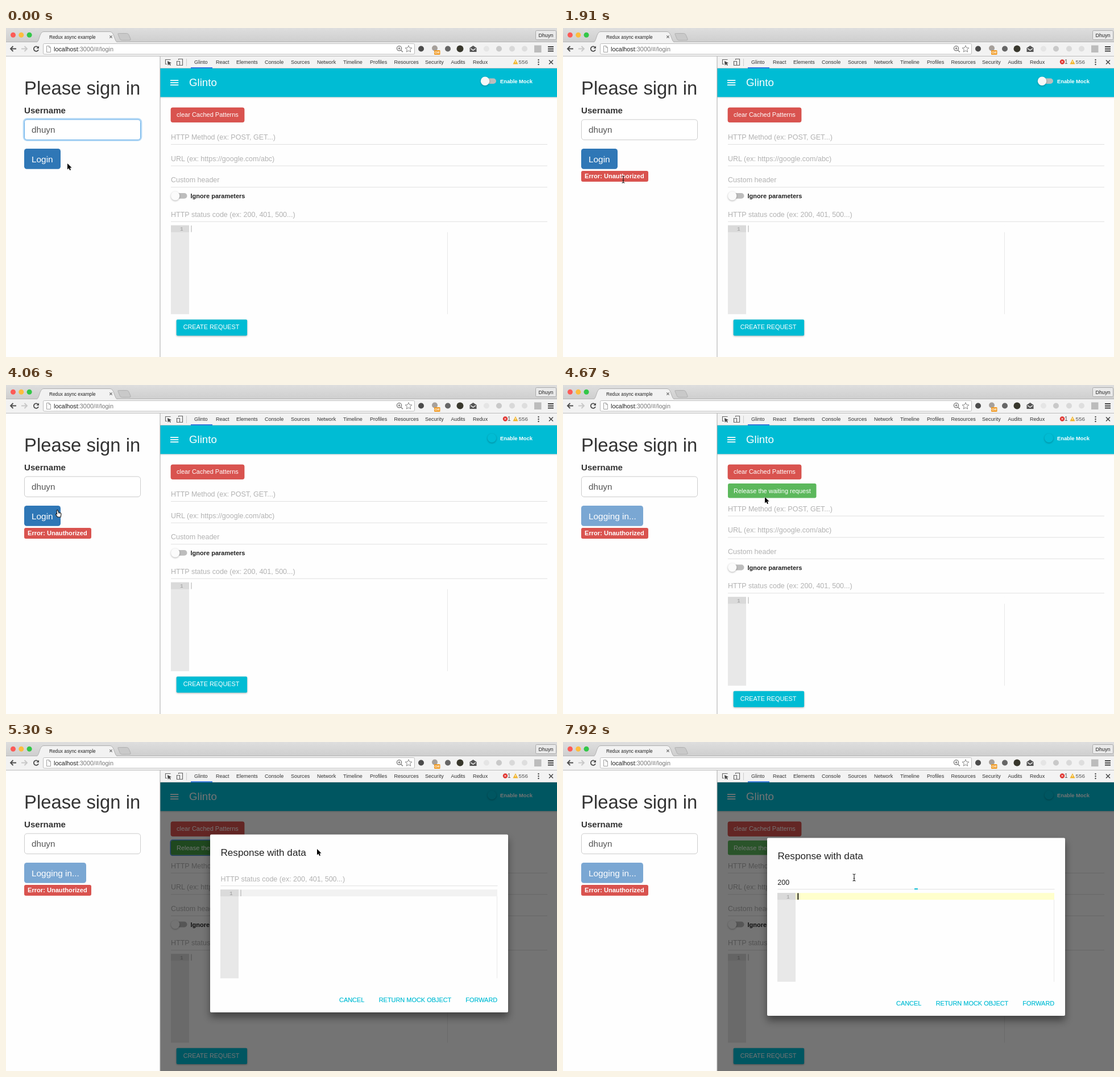
Write an HTML page that moves like this. It is 969 px wide and 578 px high and loops after 8000 ms.

```html
<!DOCTYPE html>
<html lang="en">
<head>
<meta charset="utf-8">
<title>Sign in demo</title>
<style>
html, body { margin: 0; width: 100%; height: 100%; overflow: hidden; background: #fff; }
svg { display: block; width: 969px; height: 578px; font-family: "Liberation Sans", Arial, sans-serif; }
text { white-space: pre; }
.mono { font-family: "Liberation Mono", monospace; }
.blur { filter: blur(7px); }
.soft { filter: drop-shadow(0 1px 1.5px rgba(0,0,0,.3)); }
</style>
</head>
<body>
<script>
const LOOP = 8000, CYAN = '#00bcd4', RED = '#d9534f', HINT = '#b2b2b2';

const rect = (x, y, w, h, fill, more = '') =>
  `<rect x="${x}" y="${y}" width="${w}" height="${h}" fill="${fill}" ${more}/>`;
const circle = (x, y, r, fill, more = '') => `<circle cx="${x}" cy="${y}" r="${r}" fill="${fill}" ${more}/>`;
const text = (x, y, size, fill, str, more = '') =>
  `<text x="${x}" y="${y}" font-size="${size}" fill="${fill}" ${more}>${str}</text>`;
const line = (d, stroke, width = 1, more = '') =>
  `<path d="${d}" fill="none" stroke="${stroke}" stroke-width="${width}" ${more}/>`;
const shape = (d, fill, more = '') => `<path d="${d}" fill="${fill}" ${more}/>`;
const group = (id, body, more = '') => `<g id="${id}" ${more}>${body}</g>`;
const bold = 'font-weight="700"';

function browser() {
  const lights = ['#fc5b57', '#fdbd3e', '#33c748'].map((c, i) => circle(12.5 + i * 14.3, 12.3, 4.5, c)).join('');
  return `<defs><linearGradient id="strip" x2="0" y2="1"><stop stop-color="#dedede"/>
    <stop offset="1" stop-color="#cecece"/></linearGradient></defs>` +
    rect(0, 0, 969, 25, 'url(#strip)') + rect(0, 24, 969, 1, '#b4b4b4') + lights +
    shape('M197 11Q196 9.500 198.500 9.500H212.500Q215 9.500 216 12L219 19Q220 21.500 217 21.500H204Q201.500 21.500 200.500 19.500Z', '#c9c9c9', 'stroke="#aaa" stroke-width=".8"') +
    shape('M53 25.500C59 25 58.500 6.500 66 6.500H183C191 6.500 190 25 197 25.500Z', '#f2f2f2', 'stroke="#aaa" stroke-width=".9"') +
    rect(0, 25, 969, 24, '#f2f2f2') + rect(0, 49, 969, 1, '#bcbcbc') +
    text(76, 18.5, 8.3, '#222', 'Redux async example') +
    line('M182.300 13.300l4.400 4.400m0-4.400l-4.400 4.400', '#666', 1.1) +
    rect(931.5, 4.5, 36, 16, '#e9e9e9', 'rx="2" stroke="#aaa"') +
    text(936.5, 16, 9, '#222', 'Dhuyn') +
    line('M18 36.500H8M12.500 32L8 36.500L12.500 41', '#4f4f4f', 1.9) +
    line('M27 36.500H37M32.500 32L37 36.500L32.500 41', '#c8c8c8', 1.9) +
    line('M56.300 34A4.200 4.200 0 1 0 57 38', '#4f4f4f', 1.8) + shape('M58 31.500V36H53.500Z', '#4f4f4f') +
    rect(65.5, 27.5, 653, 18.5, '#fff', 'rx="2" stroke="#bdbdbd"') +
    shape('M71.500 31.500H76L78.500 34V42.500H71.500Z', '#fafafa', 'stroke="#999" stroke-width=".9"') +
    line('M75.700 31.500V34.300H78.500', '#999', .9) +
    text(84, 40.5, 10.85, '#777', '<tspan fill="#222">localhost</tspan>:3000/#/login');
}

function toolbarIcons() {
  const star = Array.from({ length: 10 }, (_, i) => {
    const a = i * Math.PI / 5, r = i % 2 ? 2.8 : 6.3;
    return `${708 + r * Math.sin(a)} ${37 - r * Math.cos(a)}`;
  }).join('L');
  return circle(691.5, 35.8, 4.1, 'none', 'stroke="#777" stroke-width="1.3"') +
    line('M694.500 39L698 42.300M689.500 35.800H693.500M691.500 33.800V37.800', '#777', 1.2) +
    shape(`M${star}Z`, '#fff', 'stroke="#888"') +
    circle(730, 36.5, 5, '#4b4b4b') + circle(754, 35.5, 5, '#a6a09b') +
    rect(753, 39, 10.5, 8, '#f09a24', 'rx="1"') + text(754, 45.3, 5.7, '#fff', 'Off', bold) +
    circle(777, 36.5, 5, '#666') + circle(798.5, 36.5, 6, '#38372c') +
    shape('M815.500 35L821.500 31L827.500 35V42H815.500Z', '#555') +
    line('M817 36L821.500 39L826 36', '#f2f2f2', 1.5) +
    [[845, '#e5e5e5'], [867, '#c9c9c9'], [890, '#d9d9d9'], [912, '#dedede']].map(([x, c]) => circle(x, 36.5, 5, c)).join('') +
    rect(929, 30.5, 12.5, 12.5, '#bcbcbc') +
    line('M953 33H963M953 36.700H963M953 40.400H963', '#444', 2);
}

function signIn() {
  return rect(0, 50, 271, 528, '#fefefe') +
    text(32, 117, 32.8, '#333', 'Please sign in') +
    text(32, 149.5, 15.1, '#333', 'Username', bold) +
    rect(31, 159.5, 207, 38, 'none', 'id="glow" rx="6" stroke="#b5d9f6" stroke-width="2.500"') +
    rect(32.5, 160.9, 204, 35.6, '#fff', 'id="field" rx="4.500"') +
    text(45, 184, 15.2, '#555', 'dhuyn') +
    rect(31.2, 211.2, 110.6, 37.4, 'none', 'id="ring" rx="5" stroke="#9cc3ea"') +
    rect(32, 212, 64, 35.7, '#2f77b6', 'id="login" rx="4.500"') +
    text(45, 236, 15.4, '#fff', 'Login', 'id="loginText"') +
    group('error', rect(32, 251, 118, 19, RED, 'rx="3"') + text(38, 264.4, 11.1, '#fff', 'Error: Unauthorized', bold));
}

function devTools() {
  const tabs = [['Glinto', 331], ['React', 369], ['Elements', 405], ['Console', 455], ['Sources', 501], ['Network', 547],
    ['Timeline', 593], ['Profiles', 640], ['Resources', 682.5], ['Security', 737], ['Audits', 782.5], ['Redux', 821]];
  return rect(271, 50, 698, 21, '#f3f3f3') + rect(271, 70, 698, 1, '#ccc') +
    line('M289 56V55.500H280.500V63.500H283', '#666', 1.1) +
    shape('M284 58L291 61.500L288 62.500L290 65L288.700 66L286.700 63.500L284.800 66Z', '#444') +
    line('M303.500 56V54.500H310.500V65.500H305M300.500 58.500H305.500V65.500H300.500Z', '#666', 1.2) +
    rect(317, 54, 1, 13, '#ccc') + rect(325, 69, 38, 2, '#3b79d9') +
    tabs.map(([name, x]) => text(x, 63.2, 9.05, '#333', name)).join('') +
    group('badge', circle(878, 59.5, 4.2, '#e0322d') + line('M876.300 57.800l3.400 3.400m0-3.400l-3.400 3.400', '#fff', 1) +
      text(882, 63.2, 10, '#555', '1')) +
    shape('M896 55L900.500 63.500H891.500Z', '#f2b52b') + rect(895.5, 58, 1, 3, '#fff') +
    text(901.5, 63.2, 9.8, '#555', '556') +
    [56, 60, 64].map(y => circle(936.5, y, 1.2, '#444')).join('') +
    line('M955 56.500l7 7m0-7l-7 7', '#444', 1.5);
}

function editor(x, y, width, marginX, id) {
  return rect(x, y, 32, 156, '#e8e8e8') + rect(x, y, 32, 12, '#dadada') +
    rect(marginX, y, 1, 156, '#e8e8e8') +
    rect(x + 32, y, width - 32, 12, '#fefefe', `id="${id}Line"`) +
    text(x + 16, y + 9.3, 9.5, '#999', '1', 'class="mono"') +
    rect(x + 35.5, y + .3, 1, 11.5, '#aaa', `id="${id}Caret"`);
}

function panel() {
  const field = (label, y) => text(290, y, 12.5, HINT, label) + rect(290, y + 8, 662, 1, '#e0e0e0');
  return rect(271, 71, 698, 507, '#fefefe') +
    rect(271, 121, 698, 1, '#9fcfd6') + rect(271, 122, 698, 1.5, '#e9eeee') + rect(271, 71, 698, 50, CYAN) +
    line('M289 92.200H303.300M289 96.200H303.300M289 100.200H303.300', '#fff', 1.7) +
    text(322, 102.4, 18.7, '#fff', 'Glinto') +
    rect(838, 88.5, 24, 9.5, '#bdbdbd', 'id="track" rx="4.750"') +
    circle(842.5, 93.2, 7.7, '#f7f7f7', 'id="thumb" class="soft"') +
    text(869, 96.6, 9.3, '#fff', 'Enable Mock', bold) +
    rect(290, 140, 129, 25.5, RED, 'rx="3" stroke="#d04540" stroke-width=".7"') +
    text(300, 156.4, 11, '#fff', 'clear Cached Patterns') +
    group('release', rect(289.3, 172.3, 157, 27, 'none', 'id="releaseRing" rx="3.500" stroke="#3f84d8" stroke-width="1.600"') +
      rect(290, 173, 155.5, 25.5, '#5cb85c', 'id="releaseBox" rx="3"') +
      text(300, 189.6, 11, '#fff', 'Release the waiting request')) +
    group('form', field('HTTP Method (ex: POST, GET...)', 196) + field('URL (ex: https://google.com/abc)', 233.6) +
      field('Custom header', 271.2) +
      rect(293, 290, 25.5, 9.8, '#bdbdbd', 'rx="4.900"') + circle(297.7, 295, 7.7, '#fbfbfb', 'class="soft"') +
      text(324.5, 299, 11, '#222', 'Ignore parameters', bold) +
      field('HTTP status code (ex: 200, 401, 500...)', 331.6) +
      editor(290, 346.7, 662, 776, 'page') +
      rect(299.7, 512.2, 124.4, 28.3, CYAN, 'rx="2" class="soft"') +
      text(311.7, 529.2, 10.85, '#fff', 'CREATE REQUEST'));
}

function dialog() {
  const action = (x, label) => text(x, 294.6, 10.95, CYAN, label, `stroke="${CYAN}" stroke-width=".200"`);
  return group('dialog', rect(359, 8, 524, 313, '#000', 'opacity=".420" class="blur"') +
    rect(359, 0, 524, 312.5, '#fefefe', 'rx="2"') +
    text(377.5, 37, 17.1, '#222', 'Response with data') +
    text(377.5, 82.4, 12.5, HINT, 'HTTP status code (ex: 200, 401, 500...)', 'id="hint"') +
    text(377.3, 82.4, 12.5, '#222', '', 'id="code"') +
    rect(377, 69.5, 1, 15.5, '#222', 'id="codeCaret"') +
    rect(377.5, 89.7, 487, 1, '#e0e0e0') +
    rect(-243.5, 88.7, 487, 2, CYAN, 'id="underline"') +
    editor(377, 96.7, 487, 863, 'modal') +
    action(586, 'CANCEL') + action(655.7, 'RETURN MOCK OBJECT') + action(808.3, 'FORWARD'));
}

function pointers() {
  const edge = 'stroke="#fff" stroke-width="1" stroke-linejoin="round" paint-order="stroke"';
  return group('arrow', shape('M0 0V10.500L2.500 8.300L4.200 12L6 11.200L4.400 7.600H7.600Z', '#000', edge)) +
    group('beam', line('M-2.500-6Q0-6 0-4.500V4.500Q0 6-2.500 6M2.500-6Q0-6 0-4.500M0 4.500Q0 6 2.500 6M-1.300 1.500H1.300', '#222', 1.1)) +
    group('hand', shape('M-2.500-6Q-1.200-7 -.600-5.500L.300-2.200L3.500-1.500Q5-1 5 .500L4.200 6H-1.200L-4.500 1.500Q-4.500-.300-2.300 .800L-3-5Q-3-5.700-2.500-6Z', '#fff', 'stroke="#111" stroke-width="1.100"') +
      line('M.800-2V.300M2.800-1.500V.500', '#111', .7));
}

document.body.innerHTML = '<svg xmlns="http://www.w3.org/2000/svg" viewBox="0 0 969 578">' +
  browser() + toolbarIcons() + signIn() + panel() + dialogShade() + devTools() +
  rect(270.5, 50, 1, 528, '#a9a9a9') + dialog() + pointers() + '</svg>';

function dialogShade() {
  return rect(271, 71, 698, 507, '#000', 'id="shade" opacity=".540"');
}

// Pointer: time, kind, x, y
const track = [
  [0, 'arrow', 108, 238], [120, 'hand', 78, 231], [590, 'arrow', 90, 245], [710, 'arrow', 98, 255],
  [1400, 'arrow', 96, 254], [1670, 'hand', 88, 238], [1790, 'arrow', 98, 251], [1910, 'beam', 106, 266],
  [2030, 'beam', 109, 272], [2150, 'arrow', 112, 268], [2380, 'arrow', 114, 266],
  [2500, 'arrow', 135, 268], [2620, 'arrow', 220, 290], [2740, 'arrow', 330, 296], [2860, 'arrow', 490, 250],
  [2980, 'arrow', 650, 175], [3100, 'arrow', 785, 112], [3210, 'hand', 847, 98],
  [3550, 'arrow', 780, 112], [3670, 'arrow', 570, 150], [3790, 'arrow', 290, 178], [3910, 'arrow', 116, 188],
  [4060, 'hand', 92, 226], [4530, 'arrow', 239, 202], [4670, 'arrow', 355, 197], [4880, 'hand', 424, 189],
  [5150, 'beam', 424, 189], [5300, 'arrow', 547, 188], [5680, 'beam', 512, 238]
];

// Each step overrides parts of the state from its time on
const steps = [
  [0, { focus: true, login: 'idle', code: '', hint: 1, underline: 0, thumb: 842.5 }],
  [350, { focus: false, login: 'pressed' }], [470, { login: 'busy' }],
  [1060, { login: 'idle', error: true }],
  [1670, { login: 'hover' }], [1790, { login: 'idle' }],
  [3320, { thumb: 848 }], [3440, { thumb: 854.5, mock: true }],
  [4210, { login: 'pressed' }], [4350, { login: 'busy', ring: true }],
  [4530, { ring: false, release: 'idle' }],
  [4880, { release: 'hover' }], [5030, { release: 'focus' }],
  [5150, { dialog: 118.5 }], [5300, { dialog: 162.5, shade: true }], [5470, { dialog: 167.8 }], [5680, { dialog: 168.5 }],
  [5890, { release: 'idle', underline: .91, typing: true }], [6100, { underline: 1 }],
  [6240, { code: '2', hint: .45 }], [6360, { hint: .12 }], [6480, { hint: 0 }],
  [6630, { code: '20' }], [6870, { code: '200' }], [7100, { code: '2000' }], [7460, { code: '200' }],
  [7690, { typing: false, editing: true, underline: .45 }], [7805, { underline: .1 }], [7920, { underline: .012 }]
];

const $ = id => document.getElementById(id);
const set = (id, attrs) => { for (const k in attrs) $(id).setAttribute(k, attrs[k]); };
const show = (id, on) => set(id, { visibility: on ? 'inherit' : 'hidden' });
const loginFill = { idle: '#2f77b6', hover: '#286090', pressed: '#204d74', busy: '#7aa7d3' };

function draw(time) {
  const s = Object.assign({}, ...steps.filter(([t]) => t <= time).map(([, change]) => change));
  const [, kind, x, y] = track.filter(([t]) => t <= time).pop();
  const busy = s.login === 'busy', lit = s.release === 'hover' || s.release === 'focus';

  show('glow', s.focus);
  set('field', { stroke: s.focus ? '#66afe9' : '#ccc' });
  set('login', { width: busy ? 109 : 64, fill: loginFill[s.login] });
  $('loginText').textContent = busy ? 'Logging in...' : 'Login';
  show('ring', s.ring);
  show('error', s.error);
  show('badge', s.error);

  show('track', !s.mock);
  set('thumb', { cx: s.thumb, fill: s.mock ? CYAN : '#f7f7f7' });
  show('release', s.release);
  show('releaseRing', s.release === 'focus');
  set('releaseBox', { fill: lit ? '#449d44' : '#5cb85c' });
  set('form', { transform: `translate(0 ${s.release ? 25.6 : 0})` });
  set('pageLine', { fill: s.dialog && !s.shade ? '#f0f0f0' : '#fefefe' });

  show('shade', s.shade);
  show('dialog', s.dialog);
  set('dialog', { transform: `translate(0 ${s.dialog || 0})` });
  set('hint', { opacity: s.hint });
  $('code').textContent = s.code;
  show('codeCaret', s.typing);
  set('codeCaret', { x: 377 + s.code.length * 6.95 });
  set('underline', { transform: `translate(621 0) scale(${s.underline} 1)` });
  set('modalLine', { fill: s.editing ? '#ffffcc' : '#f2f2f2' });
  set('modalCaret', { fill: s.editing ? '#000' : '#aaa', width: s.editing ? 1.7 : 1 });

  for (const id of ['arrow', 'beam', 'hand']) show(id, id === kind);
  set(kind, { transform: `translate(${x} ${y})` });
}

const start = performance.now();
function tick() {
  draw((performance.now() - start) % LOOP);
  requestAnimationFrame(tick);
}
tick();
</script>
</body>
</html>
```
